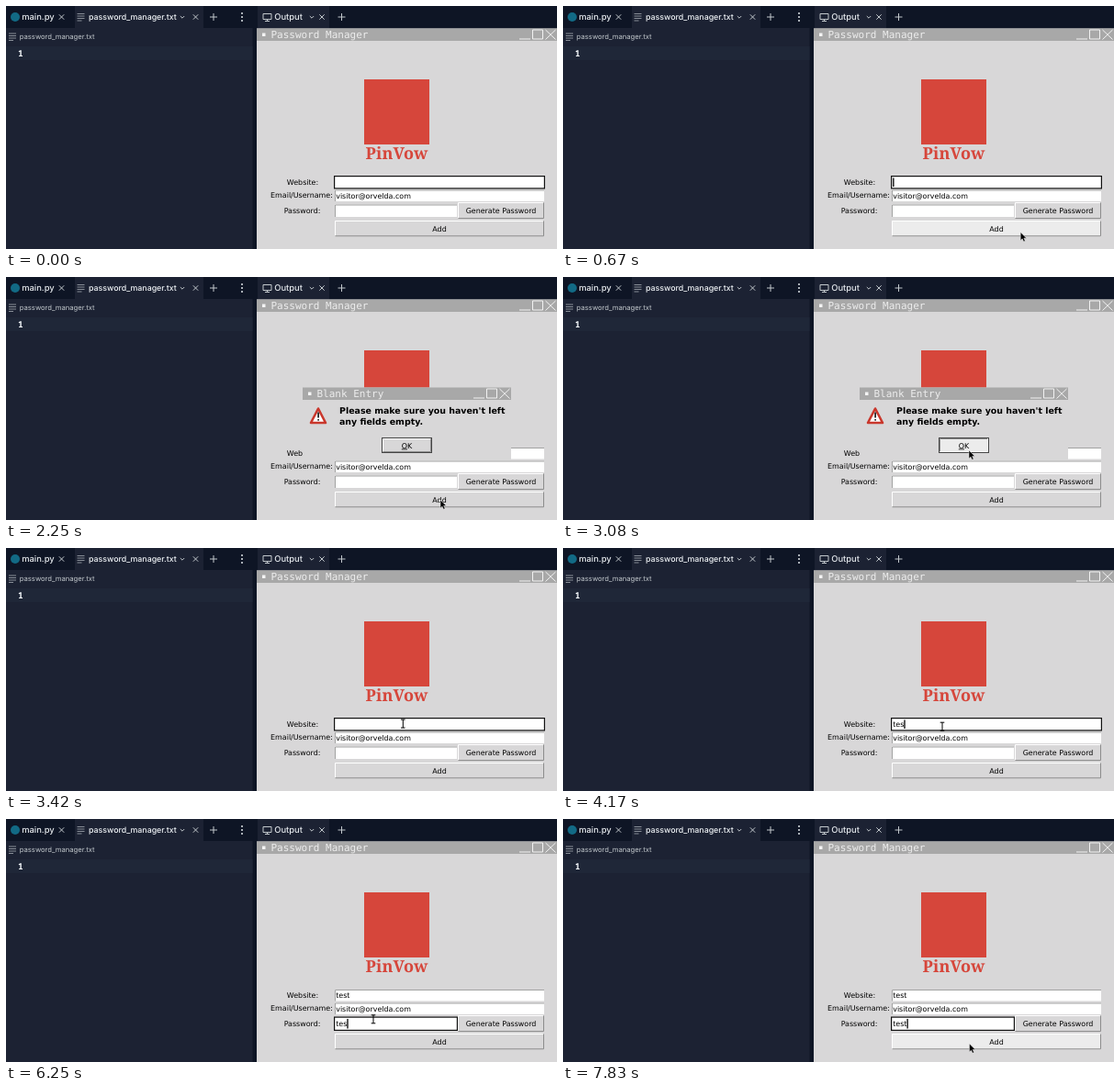
An HTML page for the animation above (8 s loop, 600 px wide and 265 px high).

```html
<!DOCTYPE html>
<html lang="en">
<head>
<meta charset="utf-8">
<title>Password Manager</title>
<style>
  html, body { margin: 0; width: 100%; height: 100%; overflow: hidden; background: #0e1525; }
  svg { display: block; width: 600px; height: 265px; }
  text { text-rendering: geometricPrecision; white-space: pre; }
  .ui { font: 500 9.4px Inter, sans-serif; fill: #e6eaee; }
  .file { font: 500 8.8px Inter, sans-serif; fill: #f0f4f7; }
  .crumb { font: 7.65px Inter, sans-serif; fill: #c2c8cc; }
  .tk { font: 7.95px "DejaVu Sans", sans-serif; fill: #000; }
  .bar { font: 11px "DejaVu Sans Mono", monospace; fill: #ececec; }
  .msg { font: bold 9.43px "DejaVu Sans", sans-serif; fill: #000; }
  .brand { font: bold 18px "Noto Serif", serif; fill: #d6463b; }
  .code { font: bold 9.5px "Noto Sans Mono", monospace; fill: #f5f9fc; }
  .line { fill: none; stroke: #c2c8cc; stroke-width: 1; }
  .frame { fill: none; stroke: #f2f2f2; stroke-width: 1; }
</style>
</head>
<body>
<svg id="stage" viewBox="0 0 600 265" xmlns="http://www.w3.org/2000/svg"></svg>
<script>
const stage = document.getElementById('stage');
const GREY = '#d8d7d8';

const rect = (x, y, w, h, fill, extra = '') =>
  `<rect x="${x}" y="${y}" width="${w}" height="${h}" fill="${fill}" ${extra}/>`;
const text = (x, y, s, cls, extra = '') =>
  `<text x="${x}" y="${y}" class="${cls}" ${extra}>${s}</text>`;
const path = (d, cls = 'line', extra = '') => `<path d="${d}" class="${cls}" ${extra}/>`;
const mid = 'text-anchor="middle"';

const cross = (x, y, r = 2.7) => path(`M${x - r} ${y - r}l${2 * r} ${2 * r}m0 ${-2 * r}l${-2 * r} ${2 * r}`);
const plus = (x, y) => path(`M${x - 4} ${y}h8M${x} ${y - 4}v8`);
const chevron = (x, y) => path(`M${x - 2.2} ${y - 1}l2.2 2.2l2.2 -2.2`);
const lines = (x, y) => path(`M${x} ${y}h8m-8 2.5h8m-8 2.5h8m-8 2.5h5`, 'line', 'opacity=".65"');

// Raised button face with light and dark edges
function button(id, x, y, w, h, label) {
  return `<g id="${id}">` + rect(x, y, w, h, GREY, 'class="face"') +
    path(`M${x + .5} ${y + h - 1}V${y + .5}H${x + w - 1}`, 'hi', 'fill="none" stroke="#fff"') +
    path(`M${x + .5} ${y + h - .5}H${x + w - .5}V${y + .5}`, 'lo', 'fill="none" stroke="#8c8c8c"') +
    text(x + w / 2, y + h / 2 + 3, label, 'tk', mid) + '</g>';
}

function entry(id, x, y, w, h, value = '') {
  return `<g id="${id}">` + rect(x, y, w, h, '#fff') +
    path(`M${x + .5} ${y + h}V${y + .5}H${x + w}`, '', 'fill="none" stroke="#989898" stroke-width=".9"') +
    rect(x - .4, y - .4, w + .8, h + .8, '#fff', 'class="ring" stroke="#111" stroke-width="1.2"') +
    text(x + 1.2, y + h / 2 + 3, value, 'tk value') +
    rect(x + 1.2, y + 1.5, 1.3, h - 3, '#000', 'class="caret"') + '</g>';
}

function titleBar(x, y, w, title) {
  const r = x + w;
  return rect(x, y, w, 13.5, '#a8a8a8') + rect(x + 6, y + 5, 3.5, 3.5, '#f4f4f4') +
    text(x + 15.5, y + 10.5, title, 'bar') +
    path(`M${r - 41} ${y + 11.5}h12M${r - 26.5} ${y + 1.5}h11v10h-11zM${r - 12.5} ${y + 1.5}l11 10.5m0 -10.5l-11 10.5`, 'frame');
}

stage.innerHTML =
  // editor
  rect(0, 0, 600, 265, '#0e1525') + rect(0, 24, 268.5, 241, '#1c2233') +
  rect(75, 0, 140, 25, '#1c2233') + rect(0, 44, 268.5, 15, '#1f2738') +
  '<circle cx="10" cy="12" r="5" fill="#126a85"/>' +
  text(17.2, 15.2, 'main.py', 'ui') + cross(60.5, 12) +
  lines(77.5, 8.5) + text(90, 15.2, 'password_manager.txt', 'file') +
  chevron(192, 12) + cross(206.5, 12) + plus(226, 12) +
  [8, 12, 16].map(y => `<circle cx="257" cy="${y}" r="1" fill="#dfe4e8"/>`).join('') +
  lines(3, 30) + text(14.8, 36.4, 'password_manager.txt', 'crumb') + text(13, 55, '1', 'code') +
  // output tab
  rect(274, 0, 78, 25, '#1c2233') +
  path('M280 8.5h9v6h-9zM284.5 14.5v2M282 16.5h5') + text(292.3, 15.2, 'Output', 'ui') +
  chevron(333, 12) + cross(344, 12) + plus(365.5, 12) +
  // main window
  rect(273, 24.5, 327, 240.5, GREY) + titleBar(273, 24.5, 327, 'Password Manager') +
  rect(390, 80, 71, 71, '#d6463b') + text(425.5, 167, 'PinVow', 'brand', mid) +
  text(323, 195, 'Website:', 'tk', mid) + text(322, 209.3, 'Email/Username:', 'tk', mid) +
  text(322.5, 226.2, 'Password:', 'tk', mid) +
  entry('mail', 358, 200.5, 228, 12.5, 'visitor@orvelda.com') +
  entry('site', 358, 186, 228, 12.5) + entry('pass', 358, 216.5, 133, 13.5) +
  button('gen', 492, 214, 94, 18, 'Generate Password') + button('add', 358, 234, 228, 17.3, 'Add') +
  // dialog
  '<g id="dialog">' + rect(323, 120.5, 227, 78.5, GREY) + titleBar(323, 120.5, 227, 'Blank Entry') +
  path('M340 143.5L348 159H332Z', '', 'fill="#fff" stroke="#c9372c" stroke-width="2.6" stroke-linejoin="round"') +
  rect(339.3, 147.5, 1.6, 6, '#111') + rect(339.3, 155, 1.6, 1.6, '#111') +
  text(363, 149.3, "Please make sure you haven't left", 'msg') + text(363, 160.5, 'any fields empty.', 'msg') +
  rect(409.5, 175.5, 54, 16, 'none', 'stroke="#444"') +
  button('ok', 410, 176, 53, 15, '<tspan text-decoration="underline">O</tspan>K') + '</g>' +
  // pointers
  path('M0 0V9L2 7.2L3.5 10.3L5.1 9.6L3.7 6.5H6.5Z', '', 'id="arrow" fill="#000" stroke="#eee" stroke-width=".5"') +
  path('M-2.3 -4.5H2.3M0 -4.5V4.5M-2.3 4.5H2.3', '', 'id="beam" fill="none" stroke="#000" stroke-width="1"');

const $ = id => document.getElementById(id);
const show = (el, on) => el.setAttribute('visibility', on ? 'visible' : 'hidden');
const within = (t, spans) => spans.some(([a, b]) => t >= a && t < b);

// time, x, y
const route = [
  [0, 548, 268], [750, 492, 244], [1083, 492, 244], [1500, 484.6, 243], [1833, 473, 243],
  [2250, 473, 243], [2917, 441, 190], [3083, 442, 189], [3250, 442, 190], [3750, 413, 194.7],
  [4333, 413, 194.7], [4750, 400, 218.3], [6417, 400, 218.3], [6667, 443, 249], [6833, 443, 249],
  [7000, 442, 246], [7167, 441.5, 246], [7583, 441.5, 246], [7667, 442.5, 245.5], [7750, 442.5, 245.5],
  [7833, 442.5, 245], [8000, 442.5, 245]
];
const siteKeys = [3917, 4083, 4167, 4417];
const passKeys = [5833, 6083, 6250, 6500];
const siteCaret = [[500, 1167], [1417, 2167], [3500, 4583]];
const passCaret = [[4667, 6667], [6917, 7167], [7667, 8000]];

function pointAt(t) {
  const i = Math.max(1, route.findIndex(p => p[0] >= t));
  const [t0, x0, y0] = route[i - 1], [t1, x1, y1] = route[i];
  const k = (t - t0) / (t1 - t0);
  return [x0 + (x1 - x0) * k, y0 + (y1 - y0) * k];
}

function setButton(id, hover, down) {
  const g = $(id);
  g.querySelector('.face').setAttribute('fill', hover ? '#ececec' : GREY);
  g.querySelector('.hi').setAttribute('stroke', down ? '#8c8c8c' : '#fff');
  g.querySelector('.lo').setAttribute('stroke', down ? '#fff' : '#8c8c8c');
}

function setEntry(id, focus, caret, keys, t) {
  const g = $(id), value = g.querySelector('.value');
  show(g.querySelector('.ring'), focus);
  show(g.querySelector('.caret'), focus && caret);
  if (!keys) return;
  value.textContent = 'test'.slice(0, keys.filter(k => t >= k).length);
  const width = value.textContent ? value.getComputedTextLength() : 0;
  g.querySelector('.caret').setAttribute('x', 359.2 + width);
}

function draw(now) {
  const step = Math.floor((now % 8000 + 4) * 12 / 1000) % 96;
  const t = Math.round(step * 1000 / 12);
  const [x, y] = pointAt(t);
  const modal = within(t, [[2167, 3250]]);
  const typing = within(t, [[3250, 6500]]);
  const over = (l, top, r, b) => !typing && x >= l && x < r && y >= top && y < b;

  show($('dialog'), modal);
  setEntry('site', within(t, [[0, 2167], [3417, 4583]]), within(t, siteCaret), siteKeys, t);
  setEntry('mail', false, false);
  setEntry('pass', t >= 4667, within(t, passCaret), passKeys, t);
  setButton('add', !modal && over(358, 234, 586, 251), within(t, [[1667, 1833]]));
  setButton('ok', modal && over(410, 176, 463, 191), within(t, [[3000, 3250]]));
  // children made visible on their own would show through a hidden dialog
  $('dialog').style.display = modal ? '' : 'none';

  const at = `translate(${x} ${y})`;
  $('arrow').setAttribute('transform', at);
  $('beam').setAttribute('transform', at);
  show($('arrow'), t > 0 && !typing);
  show($('beam'), typing && !within(t, [[5250, 6250]]));
}

const start = performance.now();
function loop() {
  draw(performance.now() - start);
  requestAnimationFrame(loop);
}
loop();
</script>
</body>
</html>
```
